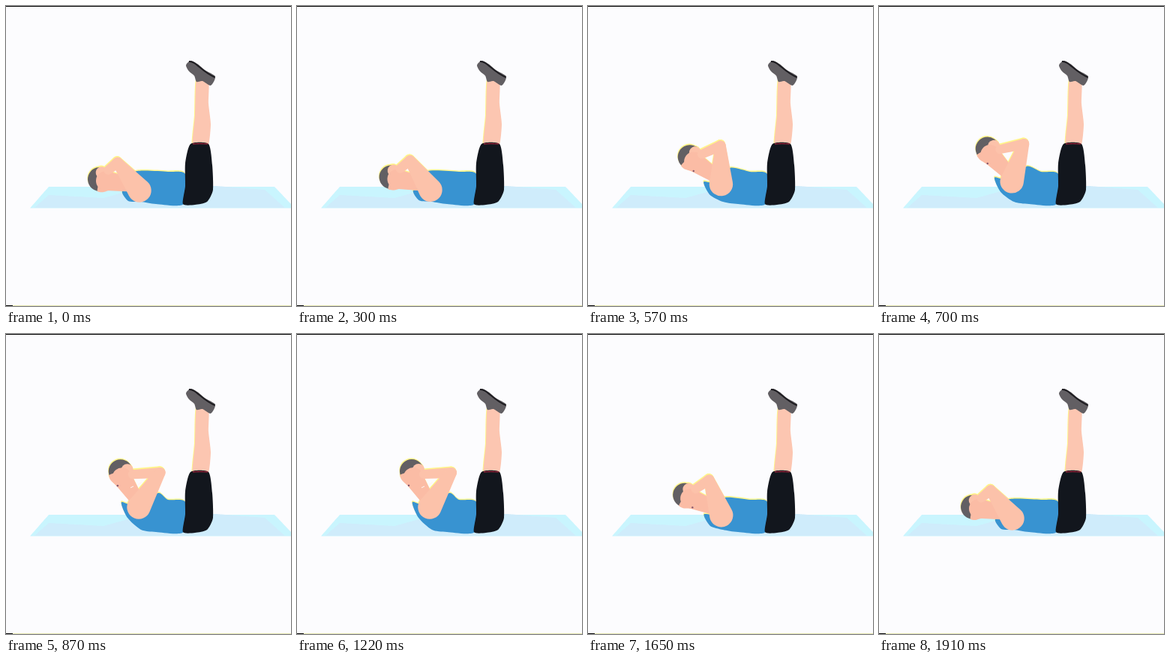
These frames come from a looping animation (380x400 px, 2010 ms). An HTML page with a canvas:

```html
<!DOCTYPE html>
<html lang="en">
<head>
<meta charset="utf-8">
<title>Crunch</title>
<style>
html, body { margin: 0; width: 100%; height: 100%; overflow: hidden; background: #fcfcfe; }
canvas { display: block; }
</style>
</head>
<body>
<canvas id="stage" width="380" height="400"></canvas>
<script>
const ctx = document.getElementById('stage').getContext('2d');
const LOOP = 2010, FRAME = LOOP / 46;
const SKIN = '#fcc2aa', FACE = '#fbbca5', CALF = '#fcc6b1', HAIR = '#625f63';
const BLUE = '#3893d1', GLOW = '#fff58a';

const clamp = x => Math.min(1, Math.max(0, x));
const mix = (a, b, k) => a + (b - a) * k;
const mixPt = (a, b, k) => [mix(a[0], b[0], k), mix(a[1], b[1], k)];
const add = (a, x, y) => [a[0] + x, a[1] + y];

// 0 = lying flat, 1 = fully raised
function bendAt(ms) {
  const up = clamp((ms - 270) / 640);
  const down = clamp((ms - 1220) / 690);
  if (down > 0) return (1 + Math.cos(Math.PI * down)) / 2;
  return (Math.sin(up * Math.PI / 2) + up * up * (3 - 2 * up)) / 2;
}

// The head rises on an arc while turning; hand and elbow follow in its frame
function poseAt(bend) {
  const arc = Math.sin(Math.PI * bend);
  const head = add(mixPt([125, 231], [153, 183], bend), -5 * arc, -3 * arc);
  const turn = mix(-61, 0, bend) * Math.PI / 180;
  const c = Math.cos(turn), s = Math.sin(turn);
  const onHead = (x, y) => add(head, x * c - y * s, x * s + y * c);
  return {
    bend, head, turn,
    face: onHead(2, 8),
    mouth: onHead(-4, 19),
    wrist: onHead(16, 4),
    elbow: onHead(...mixPt([31, 10], [53, 2], bend)),
    shoulder: mixPt([178, 246], [177, 231], bend),
    armpit: mixPt([172, 221], [203, 212], bend)
  };
}

// Closed outline through the points; k = 0 keeps the corners
function blob(pts, color, k = .13) {
  const n = pts.length, at = i => pts[(i + n) % n];
  ctx.beginPath();
  ctx.moveTo(...pts[0]);
  for (let i = 0; i < n; i++) {
    const a = at(i - 1), b = at(i), c = at(i + 1), d = at(i + 2);
    ctx.bezierCurveTo(b[0] + (c[0] - a[0]) * k, b[1] + (c[1] - a[1]) * k,
      c[0] - (d[0] - b[0]) * k, c[1] - (d[1] - b[1]) * k, ...c);
  }
  ctx.fillStyle = color;
  ctx.fill();
}

function disc([x, y], r, color) {
  ctx.beginPath();
  ctx.arc(x, y, r, 0, 7);
  ctx.fillStyle = color;
  ctx.fill();
}

// Tapered capsule between two circles
function limb(a, ra, b, rb, color) {
  const dx = b[0] - a[0], dy = b[1] - a[1];
  const dir = Math.atan2(dy, dx), side = Math.acos((ra - rb) / Math.hypot(dx, dy));
  ctx.beginPath();
  ctx.arc(...a, ra, dir + side, dir - side + 2 * Math.PI);
  ctx.arc(...b, rb, dir - side, dir + side);
  ctx.fillStyle = color;
  ctx.fill();
}

function line(color, width, from, ...curve) {
  ctx.beginPath();
  ctx.moveTo(...from);
  ctx.bezierCurveTo(...curve);
  ctx.strokeStyle = color;
  ctx.lineWidth = width;
  ctx.stroke();
}

function drawMat() {
  blob([[57, 241], [358, 241], [380, 264], [380, 269.5], [32, 269.5]], '#c9f5fe', 0);
  blob([[38, 269], [57, 252], [130, 256], [170, 245], [280, 240], [345, 245], [372, 269]], '#cfecfb', 0);
}

function drawLeg() {
  const calf = [[254, 98], [270, 98], [270, 130], [273, 158], [269, 188], [249, 188], [252, 145]];
  blob(calf.map(p => add(p, -1, 0)), GLOW, .1);
  blob(calf, CALF, .1);
  blob([[240, 79], [246, 73], [255, 77], [266, 86], [279, 94], [273, 106],
    [262, 100], [254, 101], [251, 93], [244, 87]], HAIR);
  line('#1d1c20', 2, [244, 74], 253, 73, 260, 87, 278.5, 95);
  blob([[246, 184], [270, 184], [275, 212], [276, 245], [268, 261], [252, 265],
    [236, 264], [239, 240], [239, 210]], '#12161d', .11);
  line('#c52843', 1, [249, 184], 255, 183.5, 262, 183.5, 269, 184);
}

function drawTorso(m, glow) {
  const s = m.shoulder;
  blob([add(s, -23, mix(1, -7, m.bend)), add(s, -15, 14), [180, 261], [200, 264],
    [237, 264], [239, 224], [216, 221], m.armpit, s], glow || BLUE, .12);
}

function drawHead(m, glow) {
  ctx.save();
  ctx.translate(...m.head);
  ctx.rotate(m.turn);
  disc([0, 0], 16, glow || HAIR);
  blob([[-15.5, 5], [-6, 1.5], [2, 0], [16, -3], [16, 8], [4, 20], [-4, 20], [-13, 12]], glow || FACE, .1);
  disc([9, -2], 8, glow || SKIN);
  ctx.restore();
  limb(m.face, 13, add(m.shoulder, 0, -6), 8, glow || FACE);
}

function drawArm(m, glow) {
  limb(m.wrist, 6, m.elbow, 7, glow || SKIN);
  limb(m.elbow, 7, m.shoulder, 15.7, glow || SKIN);
}

function drawBody(m) {
  ctx.save();
  ctx.translate(-.6, -1.6);
  for (const part of [drawTorso, drawHead, drawArm]) part(m, GLOW);
  ctx.restore();
  drawTorso(m);
  drawHead(m);

  // Mouth, then the gaps inside the bent arm
  ctx.globalAlpha = clamp(m.bend * 5 - .5);
  disc(m.mouth, 1.2, '#85566a');
  ctx.globalAlpha = 1;
  drawArm(m);
  ctx.globalAlpha = clamp((m.bend - .86) * 8);
  line('#fff6f4', 1.6, [176, 201], 178, 200, 180, 198, 181, 197);
  line('#fff6f4', 1, [166, 205], 167, 204, 169, 204, 170, 203);
  ctx.globalAlpha = 1;
}

function bar(color, x, y) {
  ctx.fillStyle = color;
  ctx.fillRect(x, y, 380, 1);
}

function draw(now) {
  const ms = Math.floor((now % LOOP) / FRAME + .25) * FRAME;
  ctx.fillStyle = '#fcfcfe';
  ctx.fillRect(0, 0, 380, 400);
  drawMat();
  drawBody(poseAt(bendAt(ms)));
  drawLeg();
  bar('#050505', 0, 0);
  bar('#050505', 0, 399);
  bar('#e4e6b0', 9, 399);
}

let start;
function tick(now) {
  start ??= now;
  draw(now - start);
  requestAnimationFrame(tick);
}
draw(0);
requestAnimationFrame(tick);
</script>
</body>
</html>
```
